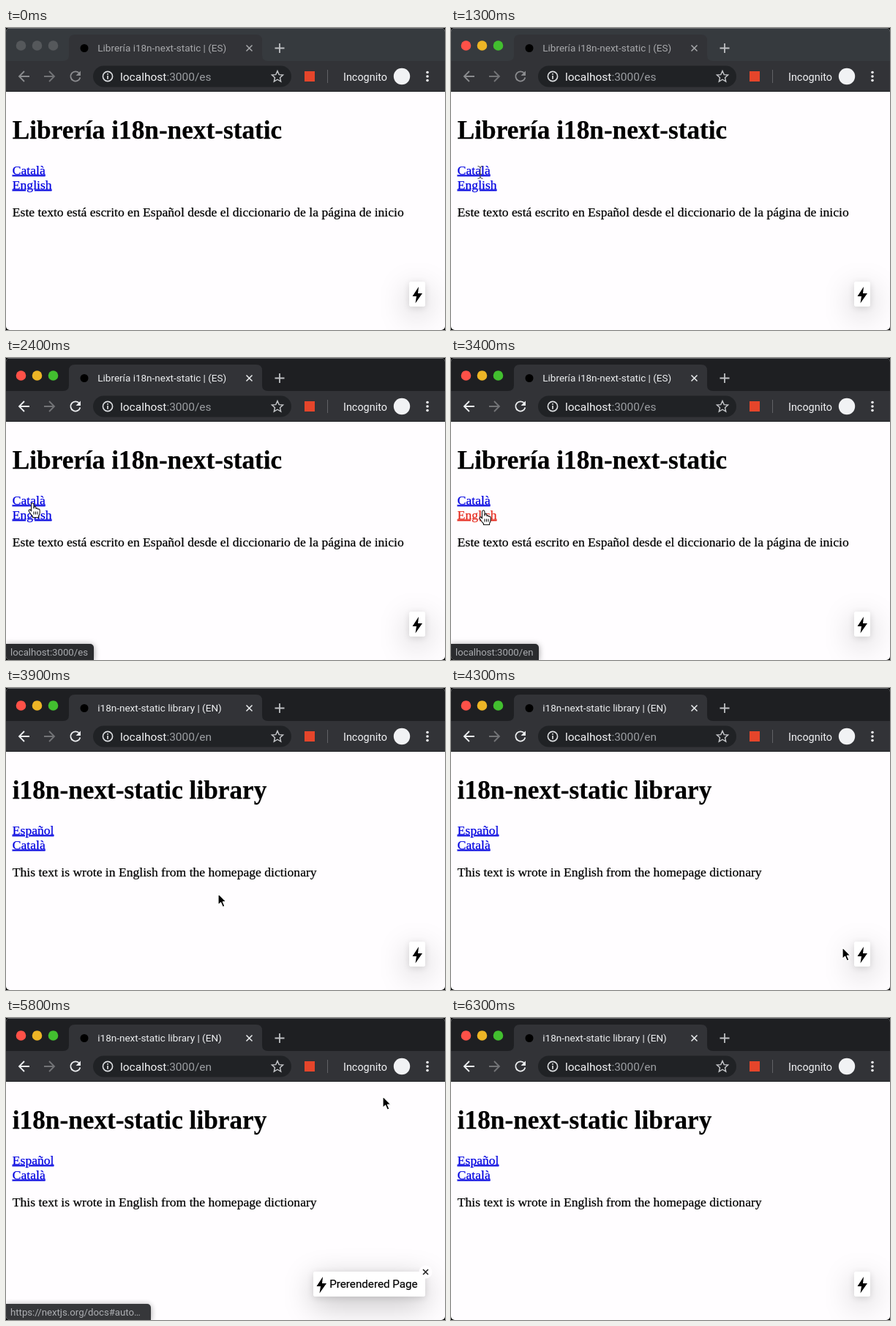
An HTML page for the animation above (6400 ms loop, 600x412 px).

```html
<!DOCTYPE html>
<html lang="en">
<head>
<meta charset="utf-8">
<title>Language switch</title>
<style>
  html, body { margin: 0; width: 100%; height: 100%; overflow: hidden; background: #000; }
  #stage { position: relative; width: 600px; height: 412px; overflow: hidden; border-radius: 5px;
    background: #fffdff; font-family: Roboto, Inter, sans-serif;
    --strip: #363a3e; --icon: #8b8c8f; --title: #a7a8ab; }
  #stage.focused { --strip: #1e1f22; --icon: #eceef0; --title: #eceef0; }
  svg { position: absolute; left: 0; top: 0; }
  .line { fill: none; stroke: var(--icon); stroke-width: 1.8; }
  .white { fill: #f1f2f4; }
  .page { font-family: "Liberation Serif", Times, serif; font-size: 17.6px; stroke: #000; stroke-width: .25; }
  .link { fill: #0000e0; stroke: #0000e0; text-decoration: underline; }
  .link.pressed { fill: #e5281c; stroke: #e5281c; }
  #pill { position: absolute; right: 27.5px; top: 346px; height: 34px; border-radius: 3px; background: #fff;
    overflow: hidden; white-space: nowrap; font-size: 15.2px; line-height: 35px; color: #000;
    -webkit-text-stroke: .2px #000; }
  #pill span { position: absolute; left: 22.5px; }
  #shade { position: absolute; right: 27.5px; top: 346px; height: 34px; border-radius: 3px;
    box-shadow: 0 11px 40px rgba(0,0,0,.25), 0 2px 10px rgba(0,0,0,.12); }
  #status { position: absolute; left: 0; bottom: 0; height: 22px; padding: 0 8px 0 6px; border-radius: 0 5px 0 0;
    background: #2a2b2e; color: #a9abaf; font-size: 13.2px; line-height: 23px; white-space: nowrap;
    box-shadow: 0 1px 8px rgba(0,0,0,.4); }
</style>
</head>
<body>
<div id="stage">
  <svg width="600" height="412">
    <path d="M0 0H600V45H0Z" fill="var(--strip)"/>
    <path d="M0 .5H600" stroke="#6a6c6e"/>
    <path d="M0 45H600V87H0ZM78 45q8 0 8-8V17q0-8 8-8H342q8 0 8 8V37q0 8 8 8Z" fill="#323337"/>
    <path d="M0 86.5H600" stroke="#232427"/>
    <g id="lights"><circle cx="20.5" cy="24" r="6.8"/><circle cx="42.5" cy="24" r="6.8"/><circle cx="64.5" cy="24" r="6.8"/></g>
    <circle cx="107" cy="27.5" r="5.5"/>
    <text id="tab" x="125.3" y="32" font-size="13.5" fill="var(--title)"></text>
    <path class="line" d="M328.5 23.5l8 8m0-8l-8 8" style="stroke:var(--title);stroke-width:1.5"/>
    <path class="line" d="M367.5 27.5h13m-6.5-6.5v13" style="stroke:#bfc1c4"/>
    <path class="line" d="M32 66H18m7-7l-7 7 7 7"/>
    <path class="line" d="M52 66H66m-7-7l7 7-7 7" style="stroke:#737477"/>
    <path class="line" d="M100.3 62A6.6 6.6 0 1 0 101.4 67.5"/>
    <path d="M102 58.5v6.5h-6.5Z" fill="var(--icon)"/>
    <rect x="119" y="51.5" width="271" height="29" rx="14.5" fill="#202225"/>
    <circle class="line" cx="139" cy="66" r="6.6" style="stroke:#dcdee1;stroke-width:1.6"/>
    <path d="M139 65v4.7M139 62v1.8" stroke="#dcdee1" stroke-width="1.7"/>
    <text x="156" y="71.5" font-size="15.5" class="white">localhost<tspan id="path" fill="#9a9da1"></tspan></text>
    <path d="M371 58.6l2.2 5 5.4.5-4.1 3.6 1.2 5.4-4.7-2.9-4.7 2.9 1.2-5.4-4.1-3.6 5.4-.5Z" fill="none" stroke="#c6c8cb" stroke-width="1.4"/>
    <rect x="408" y="59" width="14" height="14" fill="#e5452b"/>
    <path d="M439.5 57v18" stroke="#616266"/>
    <text x="461" y="71.5" font-size="14.4" class="white">Incognito</text>
    <circle class="white" cx="541" cy="66" r="11.2"/>
    <g class="white"><circle cx="576" cy="60.5" r="1.8"/><circle cx="576" cy="66" r="1.8"/><circle cx="576" cy="71.5" r="1.8"/></g>
    <g class="page">
      <text id="heading" x="8.8" y="151" font-size="35.25" font-weight="bold"></text>
      <text id="link1" class="link" x="8.8" y="199.5"></text>
      <text id="link2" class="link" x="8.8" y="219.5"></text>
      <text id="para" x="8.8" y="257"></text>
    </g>
  </svg>
  <div id="shade"></div>
  <div id="pill">
    <svg width="22" height="34"><path d="M13 7L4.5 20H10L8.5 29.5 18 16H12Z"/></svg>
    <span>Prerendered Page</span>
  </div>
  <div id="status"></div>
  <svg width="600" height="412">
    <g id="close"><circle cx="573.5" cy="346.5" r="9" fill="#fffdff"/>
      <path d="M570 343l7 7m0-7l-7 7" stroke="#222" stroke-width="1.6"/></g>
    <g id="cursor" stroke-linejoin="round">
      <path id="arrow" d="M0 0V15.5L3.6 12.2 6.2 18.3 9 17.1 6.4 11.2H11Z" fill="#000" stroke="#fff" stroke-width="1.2"/>
      <path id="beam" d="M-3.5-8.5Q0-8.5 0-6Q0-8.5 3.5-8.5M0-6V6M-3.5 8.5Q0 8.5 0 6Q0 8.5 3.5 8.5M-2 2.5H2" fill="none" stroke="#444"/>
      <g id="hand" stroke="#111" stroke-width="1.1">
        <path d="M-1.5 8V1Q-1.3-1.2 .3-1.2T2 1V6Q4-.1 5 6.5Q7 5 7.6 7.3Q10 6.3 10.2 9V12Q10 14.5 8.6 16.5V18.5H.5V17Q-2 14.5-4.5 10.5Q-5.5 8.5-4 8T-1.5 10Z" fill="#fff"/>
        <path d="M2 10.5v4m2.5-4v4m2.5-4v4" fill="none"/>
      </g>
    </g>
  </svg>
</div>
<script>
const $ = id => document.getElementById(id);
const LOOP = 6400, STEP = 100;

const pages = {
  es: ["Librería i18n-next-static", "Català", "English",
    "Este texto está escrito en Español desde el diccionario de la página de inicio"],
  ca: ["Llibreria i18n-next-static", "Español", "English",
    "Aquest text està escrit en Català desde el diccionari de la pàgina d'inici"],
  en: ["i18n-next-static library", "Español", "Català",
    "This text is wrote in English from the homepage dictionary"]
};

// Tracks: [time, ...values], linear between entries
const pointer = [[100, 200, 302], [400, 70, 272], [700, 16, 242], [1000, 24, 210], [1300, 40, 197],
  [1600, 37, 199], [1800, 36, 199], [3000, 36, 199], [3400, 44, 209], [3600, 45, 210], [4200, 535, 351],
  [4300, 535, 354], [4500, 555, 363], [4900, 502, 365], [5700, 502, 365], [5800, 515, 107], [5900, 521, 30]];
const statusFade = [[1600, 0], [1800, .62], [1900, 1], [3700, 1], [3900, 0], [4700, 0], [5000, .9], [5100, 1],
  [5700, 1], [5800, .94], [6000, 0]];
const pillWidth = [[4300, 21.5], [4600, 152.8], [5800, 152.8], [6100, 21.5]];

// Step lists: [start time, value]
const language = [[0, "es"], [1600, "ca"], [2400, "es"], [3600, "en"]];
const hovered = [[0, "localhost:3000/es"], [2500, "localhost:3000/ca"], [3200, "localhost:3000/en"],
  [4300, "https://nextjs.org/docs#auto…"]];
const shape = [[0, ""], [100, "arrow"], [800, "beam"], [1400, "hand"], [3700, "arrow"], [4400, "hand"],
  [5800, "arrow"], [6000, ""]];
const lightColors = ["#ff5148", "#edb526", "#42bf2f"];

function track(keys, t) {
  const i = keys.findIndex(k => k[0] > t);
  if (i === 0) return keys[0].slice(1);
  if (i < 0) return keys[keys.length - 1].slice(1);
  const a = keys[i - 1], b = keys[i], p = (t - a[0]) / (b[0] - a[0]);
  return a.slice(1).map((v, n) => v + (b[n + 1] - v) * p);
}
const stepAt = (steps, t) => steps.filter(s => s[0] <= t).pop()[1];
const show = (id, on) => { $(id).style.display = on ? "" : "none"; };

function render(t) {
  const lang = stepAt(language, t);
  const [heading, link1, link2, para] = pages[lang];
  $("stage").classList.toggle("focused", t >= 1400);
  [...$("lights").children].forEach((c, i) => c.setAttribute("fill", t >= 1300 ? lightColors[i] : "#55585b"));

  const texts = { heading, link1, link2, para, tab: `${heading} | (${lang.toUpperCase()})`,
    path: ":3000/" + lang, status: stepAt(hovered, t) };
  for (const id in texts) $(id).textContent = texts[id];
  $("link2").classList.toggle("pressed", t >= 3400 && t < 3600);

  $("status").style.opacity = track(statusFade, t)[0];
  $("status").style.width = t >= 4300 ? "184px" : "";
  const [width] = track(pillWidth, t);
  $("pill").style.width = $("shade").style.width = width + "px";
  show("close", width > 22);

  const [x, y] = track(pointer, t), current = stepAt(shape, t);
  $("cursor").setAttribute("transform", `translate(${x} ${y})`);
  for (const id of ["arrow", "beam", "hand"]) show(id, id === current);
}

const start = performance.now();
function frame() {
  const t = (performance.now() - start) % LOOP;
  render(Math.floor(t / STEP) * STEP);
  requestAnimationFrame(frame);
}
frame();
</script>
</body>
</html>
```
